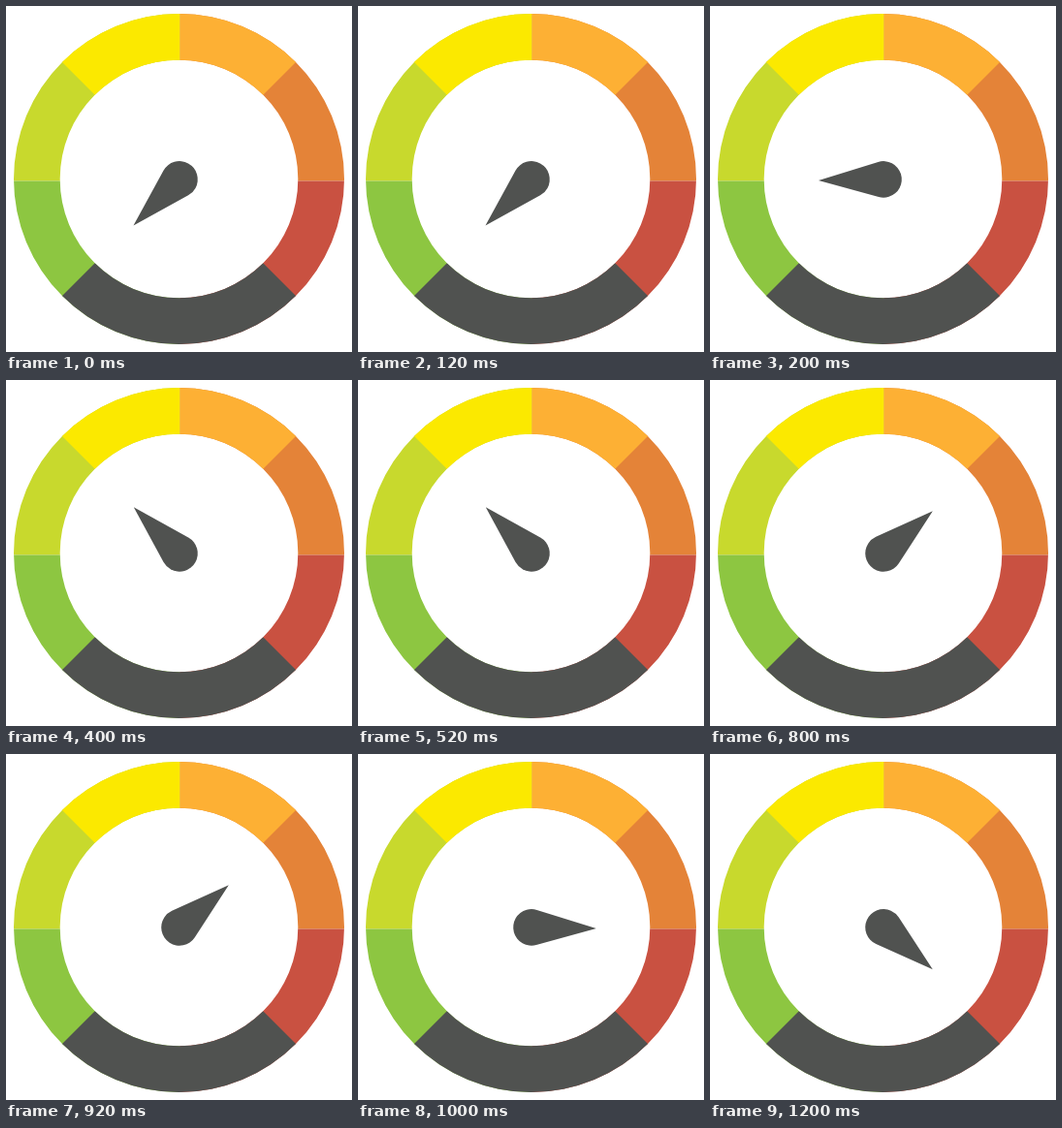
An HTML page with a canvas that plays this animation: 357 px wide and 357 px high, repeating every 1.4 s.

```html
<!DOCTYPE html>
<html lang="en">
<head>
<meta charset="utf-8">
<title>Gauge</title>
<style>
  html, body { margin: 0; width: 100%; height: 100%; overflow: hidden; background: #fff; }
  canvas { display: block; }
</style>
</head>
<body>
<canvas id="gauge" width="357" height="357"></canvas>
<script>
const ctx = document.getElementById('gauge').getContext('2d');
const SIZE = 357, MID = SIZE / 2, OUTER = 170.5, INNER = 122.8;
const SEAM_X = 179.5, SEAM_Y = 180.5;
const HUB = { x: 179, y: 178.9, r: 18.8 };
const STEP = 200;
const DARK = '#505250';

// Needle tip at each step of the sweep
const TIPS = [
  [131.5, 226.5], [112, 180], [131.8, 131.2], [179, 112],
  [229.8, 135.2], [245.8, 180], [229.8, 222.3]
];

function polygon(color, ...points) {
  ctx.fillStyle = color;
  ctx.beginPath();
  points.forEach(([x, y]) => ctx.lineTo(x, y));
  ctx.fill();
}

function rect(color, x, y, w, h) {
  ctx.fillStyle = color;
  ctx.fillRect(x, y, w, h);
}

function drawRing() {
  ctx.save();
  ctx.beginPath();
  ctx.arc(MID, MID, OUTER, 0, Math.PI * 2);
  ctx.closePath();
  ctx.moveTo(MID + INNER, MID);
  ctx.arc(MID, MID, INNER, 0, Math.PI * 2);
  ctx.clip('evenodd');
  rect('#c8d92d', 0, 0, SEAM_X, SEAM_Y);
  rect('#e48338', SEAM_X, 0, SIZE - SEAM_X, SEAM_Y);
  rect('#8dc641', 0, SEAM_Y, SEAM_X, SIZE - SEAM_Y);
  rect('#c95141', SEAM_X, SEAM_Y, SIZE - SEAM_X, SIZE - SEAM_Y);
  polygon('#fbe900', [0, 0], [SEAM_X, SEAM_X], [SEAM_X, 0]);
  polygon('#fdb034', [SEAM_X, 0], [SIZE, 0], [SEAM_X, SIZE - SEAM_X]);
  polygon(DARK, [0, SIZE], [MID, MID], [SIZE, SIZE]);
  ctx.restore();
}

// Round hub with straight sides running tangentially to the tip
function drawNeedle([x, y]) {
  const dx = x - HUB.x, dy = y - HUB.y;
  const angle = Math.atan2(dy, dx);
  const spread = Math.acos(HUB.r / Math.hypot(dx, dy));
  ctx.fillStyle = DARK;
  ctx.beginPath();
  ctx.moveTo(x, y);
  ctx.arc(HUB.x, HUB.y, HUB.r, angle + spread, angle - spread + Math.PI * 2);
  ctx.closePath();
  ctx.fill();
}

function draw(now) {
  rect('#fff', 0, 0, SIZE, SIZE);
  drawRing();
  drawNeedle(TIPS[Math.floor(now / STEP) % TIPS.length]);
}

const start = performance.now();
function tick() {
  draw(performance.now() - start);
  requestAnimationFrame(tick);
}
tick();
</script>
</body>
</html>
```
